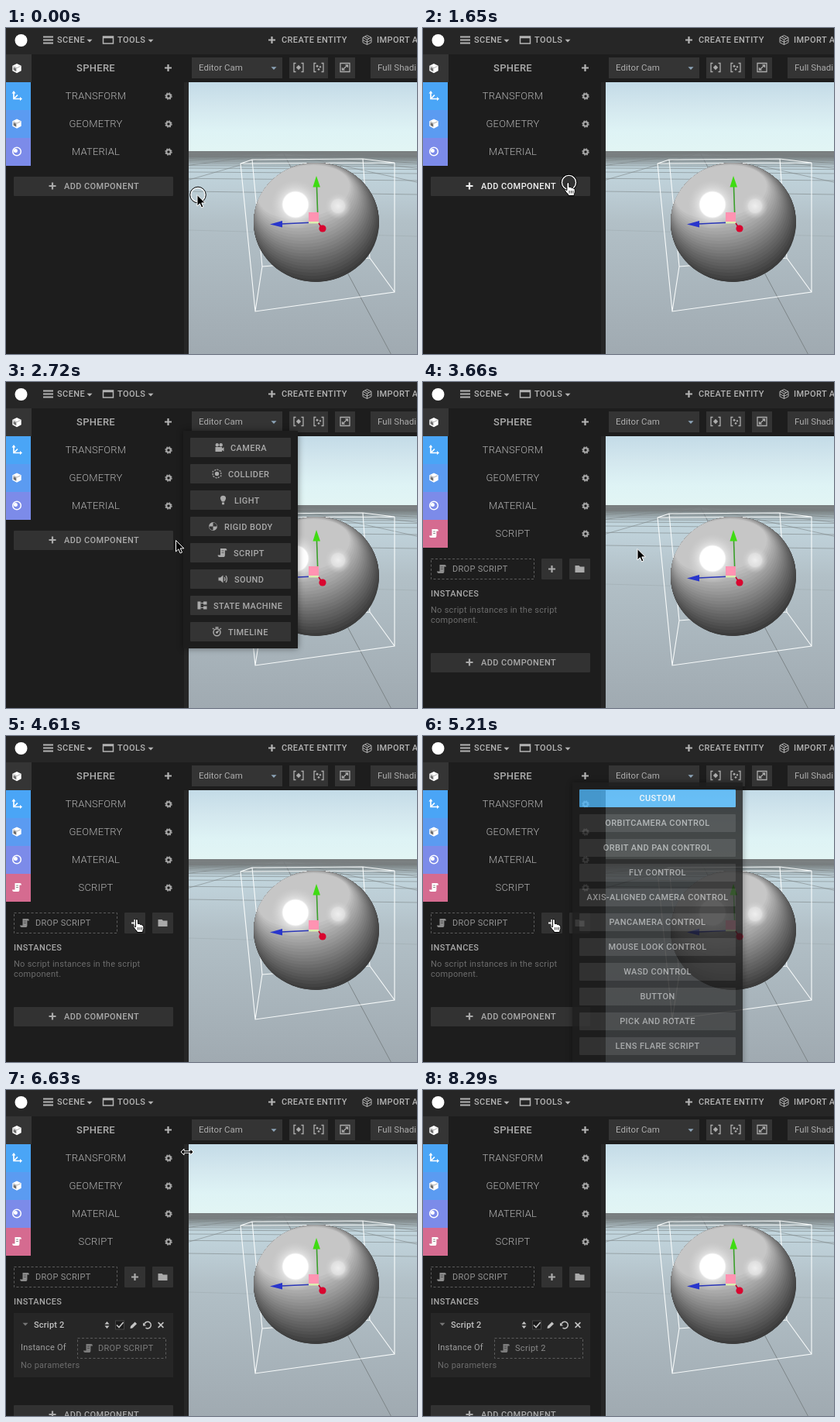
These frames come from a looping animation (531 by 421 pixels, 8.65 s). An HTML page:

```html
<!DOCTYPE html>
<html lang="en">
<head>
<meta charset="utf-8">
<title>Scene editor</title>
<style>
html, body { margin: 0; width: 100%; height: 100%; overflow: hidden; background: #1d1d1d; }
svg { display: block; width: 531px; height: 421px; font-family: Roboto, sans-serif; }
.btn { color: #aaa; }
.btn.hot { color: #f2f2f2; }
.btn.main { color: #fff; }
.btn.main.hot rect { fill: #6cc4ff; }
</style>
</head>
<body>
<svg id="stage" viewBox="0 0 531 421" xmlns="http://www.w3.org/2000/svg"></svg>
<script>
const LOOP = 8650, TICK = 118.49;
const stage = document.getElementById('stage');
const hits = [];

// --- drawing helpers -------------------------------------------------
const rect = (x, y, w, h, fill, more = '') =>
  `<rect x="${x}" y="${y}" width="${w}" height="${h}" fill="${fill}" ${more}/>`;
const ellipse = (x, y, rx, ry, fill) =>
  `<ellipse cx="${x}" cy="${y}" rx="${rx}" ry="${ry}" fill="${fill}"/>`;
const line = (x1, y1, x2, y2, more = '') =>
  `<path d="M${x1} ${y1}L${x2} ${y2}" ${more}/>`;
const group = (id, body, more = '') => `<g id="${id}" ${more}>${body}</g>`;

function text(x, y, s, o = {}) {
  const { size = 11, gap = .4, weight = 500, fill = 'currentColor', mid = false } = o;
  return `<text x="${x}" y="${y}" font-size="${size}" letter-spacing="${gap}" font-weight="${weight}"
    fill="${fill}" ${mid ? 'text-anchor="middle"' : ''}>${s}</text>`;
}

const icons = {
  plus: '<path d="M-4.5 0H4.5M0-4.5V4.5" stroke="currentColor" stroke-width="2.2"/>',
  caret: '<path d="M-3.5-1.8H3.5L0 2Z" fill="currentColor"/>',
  bars: '<path d="M-6.5-4H6.5M-6.5 0H6.5M-6.5 4H6.5" stroke="currentColor" stroke-width="1.8"/>',
  pane: '<path d="M-6.5-4.5H6.5V4.5H-6.5ZM-6.5-3H6.5" fill="none" stroke="currentColor" stroke-width="1.5"/>',
  cube: '<path d="M0-6L5.7-3.2V3.2L0 6.2L-5.7 3.2V-3.2Z" fill="currentColor"/><path d="M-4.4-1.6L-.7.2V4.2L-4.4 2.3Z" fill="#333" fill-opacity=".7"/><path d="M-4.6-2.6L0-.4L4.6-2.6" fill="none" stroke="#333" stroke-opacity=".5" stroke-width=".8"/>',
  wire: '<path d="M0-6L5.5-3.2V3.2L0 6L-5.5 3.2V-3.2ZM-5.5-3.2L0-.4L5.5-3.2M0-.4V6M-2.7-4.6L2.7-1.8M-5.5 0L0 2.8L5.5 0" fill="none" stroke="currentColor"/>',
  axis: '<path d="M-4-5V4H5M-4 4L1-1" fill="none" stroke="currentColor" stroke-width="1.7"/><path d="M-6.5-3L-4-6.5L-1.5-3ZM4 1.5L7 4L4 6.5Z" fill="currentColor"/>',
  ball: '<circle r="5.3" fill="none" stroke="currentColor" stroke-width="1.5"/><circle cx="-1.6" cy="-1" r="2.5" fill="currentColor"/>',
  gear: '<circle r="2.7" fill="none" stroke="currentColor" stroke-width="2.1"/><circle r="4.1" fill="none" stroke="currentColor" stroke-width="1.2" stroke-dasharray="1.8 1.42"/>',
  script: '<path d="M-2.5-5.5H4.2Q6-5.5 6-3H3.4V3Q3.4 5.6 1 5.6H-4Q-6 5.4-6 3H-2.5Z" fill="currentColor"/><path d="M-1-2.5H2M-1 0H2" stroke="#222" stroke-opacity=".5"/>',
  folder: '<path d="M-6-4.5H-1L.5-3H6V4.5H-6Z" fill="currentColor"/>',
  camera: '<circle cx="-2.7" cy="-3.3" r="2.2" fill="currentColor"/><circle cx="2.2" cy="-3.3" r="2.2" fill="currentColor"/><path d="M-5-.5H3.5V1.2L6-.3V5L3.5 3.6V5.5H-5Z" fill="currentColor"/>',
  collider: '<circle r="2.7" fill="currentColor"/><path d="M0-5.8L5.3-3V3L0 5.8L-5.3 3V-3Z" fill="none" stroke="currentColor" stroke-width="1.2" stroke-dasharray="2.2 1.4"/>',
  light: '<path d="M-1.6 2Q-3.6-.6-3.6-2.2A3.6 3.6 0 0 1 3.6-2.2Q3.6-.6 1.6 2ZM-1.5 3H1.5V5.8H-1.5Z" fill="currentColor"/>',
  rigid: '<circle r="5.4" fill="currentColor"/><path d="M0 0V-5A5 5 0 0 1 5 0ZM0 0V5A5 5 0 0 1-5 0Z" fill="#333"/>',
  sound: '<path d="M-6-2H-3.5L0-5V5L-3.5 2H-6Z" fill="currentColor"/><path d="M1.7-2.5Q3.3 0 1.7 2.5M3.5-4.3Q6.5 0 3.5 4.3" fill="none" stroke="currentColor" stroke-width="1.3"/>',
  state: '<path d="M-6-5H-2V5H-6ZM1.5-5H6V-1H1.5ZM1.5 1H6V5H1.5Z" fill="currentColor"/><path d="M-2-3H2M-2 3H2" stroke="currentColor"/>',
  timeline: '<circle cy=".8" r="4.5" fill="none" stroke="currentColor" stroke-width="1.5"/><path d="M-2-5.5H2M0 .8L2.4-1.4M-5.5-4.5L-4-3.2M5.5-4.5L4-3.2" stroke="currentColor" stroke-width="1.5"/><circle cy=".8" r="1.5" fill="currentColor"/>',
  frame: '<path d="M-3.5-5.5H-6V5.5H-3.5M3.5-5.5H6V5.5H3.5" fill="none" stroke="currentColor" stroke-width="1.3"/><path d="M0-3.2L3.2 0L0 3.2L-3.2 0Z" fill="currentColor"/>',
  frames: '<path d="M-3.5-5.5H-6V5.5H-3.5M3.5-5.5H6V5.5H3.5" fill="none" stroke="currentColor" stroke-width="1.3"/><path d="M-2-3.5L0-1.7L-2 .1L-3.8-1.7ZM2-2.2L3.5-.7L2 .8L.5-.7ZM0 .7L1.7 2.4L0 4.1L-1.7 2.4Z" fill="currentColor"/>',
  expand: '<path d="M-6-5.5H6V5.5H-6ZM-3.5 3.2L3.5-3.2M.4-3.2H3.5V-.1M-3.5.2V3.2H-.4" fill="none" stroke="currentColor" stroke-width="1.3"/>',
  sort: '<path d="M-3-1L0-4.5L3-1ZM-3 1L0 4.5L3 1Z" fill="currentColor"/>',
  check: '<rect x="-5.5" y="-5.5" width="11" height="11" fill="#1a1a1a" stroke="#444"/><path d="M-4 0L-1 3L4.6-3.6" fill="none" stroke="currentColor" stroke-width="1.6"/>',
  pencil: '<path d="M-4.5 4.5L-4 1.6L1.6-4L4-1.6L-1.6 4Z" fill="currentColor"/>',
  undo: '<path d="M-4.2-1A4.3 4.3 0 1 1-2.5 3.6" fill="none" stroke="currentColor" stroke-width="1.5"/><path d="M-6-3V1H-2Z" fill="currentColor"/>',
  cross: '<path d="M-3.4-3.4L3.4 3.4M3.4-3.4L-3.4 3.4" stroke="currentColor" stroke-width="1.6"/>'
};
const icon = (name, x, y, color = '') =>
  `<g transform="translate(${x} ${y})" ${color && `color="${color}"`}>${icons[name]}</g>`;

// A button that lights up while the pointer is over it and its layer shows.
function button(layer, x, y, w, h, body, o = {}) {
  hits.push({ layer, x, y, w, h });
  return `<g class="btn ${o.main ? 'main' : ''}" id="b${hits.length - 1}">` +
    rect(x, y, w, h, o.fill || '#323232', 'rx="1"') + body + '</g>';
}
const addButton = (layer, y) => button(layer, 10, y, 206, 25,
  icon('plus', 60, y + 12) + text(75, y + 16, 'ADD COMPONENT'));
const dashed = (x, y, w) =>
  rect(x + .5, y + .5, w - 1, 26, 'none', 'stroke="#5c5c5c" stroke-dasharray="3 2.5"');

// --- 3D view ---------------------------------------------------------
const stops = list => list.map(([o, c, a = 1]) =>
  `<stop offset="${o}" stop-color="${c}" stop-opacity="${a}"/>`).join('');
const linear = (id, list) => `<linearGradient id="${id}" x1="0" y1="0" x2="0" y2="1">${stops(list)}</linearGradient>`;
const radial = (id, list) => `<radialGradient id="${id}">${stops(list)}</radialGradient>`;

const defs = `<defs>
  <clipPath id="view">${rect(236, 70, 295, 351, '#fff')}</clipPath>
  <clipPath id="ball">${ellipse(401, 251, 81, 77, '#fff')}</clipPath>
  ${linear('sky', [[0, '#c3dbe7'], [.35, '#d3e7ee'], [.7, '#def3f5'], [1, '#e2f5f4']])}
  ${linear('ground', [[0, '#7b7f80'], [.035, '#a3b1b6'], [.09, '#c1d5dd'], [.2, '#bccdd5'], [.35, '#b2c0c7'], [1, '#a0aab1']])}
  ${radial('shine', [[0, '#fff'], [.5, '#fff'], [.56, '#e6e6e6', .8], [1, '#d0d0d0', 0]])}
  ${radial('glint', [[0, '#eee'], [.5, '#e2e2e2', .9], [.6, '#d8d8d8', .7], [1, '#ccc', 0]])}
</defs>`;

function grid() {
  let out = '';
  for (let i = 1; i < 22; i++) {
    out += line(236, 161 + 100 / i, 531, 161 + 108 / i, `opacity="${i < 2 ? .2 : .6}"`);
  }
  for (let k = -14; k <= 14; k++) {
    out += line(358, 161, 358 + (.536 + 4 * k) * 262, 423, `opacity="${k ? .6 : 1}"`);
  }
  return `<g stroke="#7d8588" fill="none">${out}</g>`;
}

// Nested ovals, dark at the lower right and light at the upper left.
function sphere(bands = 20) {
  let out = ellipse(401, 251, 81, 77, '#3e3e3e');
  for (let i = 0; i <= bands; i++) {
    const u = i / bands, c = Math.round(60 + 138 * u);
    out += ellipse(400 - 8 * u, 247 - 37.5 * u, 86 - 26 * u, 81 - 47.5 * u, `rgb(${c},${c},${c})`);
  }
  return `<g clip-path="url(#ball)"><g transform="rotate(-10 401 251)">${out}</g></g>`;
}

const scene = `<g clip-path="url(#view)">
  ${rect(236, 70, 295, 90, 'url(#sky)')}
  ${rect(236, 159, 295, 262, 'url(#ground)')}
  ${grid()}
  ${rect(236, 159, 295, 8, '#777b7c', 'opacity=".7"')}
  <path d="M303 175L318 170L461 169L502 174ZM303 175L322 366L502 341V174M318 170L331 308L322 366M331 308L470 297L502 341M461 169L470 297"
    fill="none" stroke="#f8fbfb" stroke-width="1.1"/>
  ${sphere()}
  <circle cx="374" cy="228" r="32" fill="url(#shine)"/>
  <circle cx="429" cy="230" r="17" fill="url(#glint)"/>
  ${line(403, 250, 401.5, 205, 'stroke="#3a9f2a" stroke-width="1.6"')}
  <path d="M401 191L406 205.5H396.5Z" fill="#3fdc12"/>
  ${line(399, 251, 356, 253, 'stroke="#2a36b8" stroke-width="1.6"')}
  <path d="M341 253.5L357 249V257.5Z" fill="#2936cc"/>
  ${rect(391, 238, 13, 12, '#ff93b2')}
  ${rect(391, 250, 13, 2.5, '#dcf0b0')}
  ${line(404, 252, 408, 258, 'stroke="#c0002c" stroke-width="1.6"')}
  <circle cx="409" cy="259" r="4.6" fill="#d9052f"/>
</g>`;

// --- panels ----------------------------------------------------------
const bar = rect(0, 0, 531, 34, '#262626') + '<circle cx="19.5" cy="16" r="8" fill="#fff"/>' +
  `<g color="#b4b4b4">${icon('bars', 54.5, 15.5)}${text(66, 19, 'SCENE')}${icon('caret', 108, 16.5)}
  ${icon('pane', 132, 15.5)}${text(144, 19, 'TOOLS')}${icon('caret', 187, 16.5)}
  ${icon('plus', 343.5, 15.5)}${text(356, 19, 'CREATE ENTITY')}
  ${icon('wire', 466.5, 15.5)}${text(479, 19, 'IMPORT ASSETS')}</g>`;

const label = { size: 11.5, gap: .05, weight: 400 };
const tools = rect(232, 34, 299, 36, '#1d1d1d') + rect(240, 38, 117, 27, '#343434') +
  rect(366, 38, 50, 27, '#343434') + rect(425, 38, 26, 27, '#343434') + rect(471, 38, 70, 27, '#343434') +
  `<g color="#acacac">${text(249, 55, 'Editor Cam', label)}
  ${icon('caret', 346, 52, '#8da4b8')}${icon('frame', 378, 51)}${icon('frames', 404, 51)}${icon('expand', 438, 51)}
  ${text(480, 55, 'Full Shading', label)}</g>`;

function row(i, name, color, pic) {
  const y = 70 + 36 * i;
  return rect(0, y, 32, 36, color) + icon(pic, 14, y + 17.5, '#fff') +
    text(116, y + 22, name, { size: 13, gap: .2, weight: 300, fill: '#b4b4b4', mid: true }) +
    icon('gear', 210, y + 18, '#a8a8a8');
}

const panel = rect(0, 34, 232, 387, '#1d1d1d') + rect(230, 70, 6, 351, '#262626') +
  rect(0, 34, 33, 36, '#353535') + icon('cube', 14, 52, '#fff') +
  text(116, 56, 'SPHERE', { size: 13, gap: .3, fill: '#acacac', mid: true }) + icon('plus', 209.5, 51.5, '#b4b4b4') +
  row(0, 'TRANSFORM', '#4aa5f6', 'axis') + row(1, 'GEOMETRY', '#5b9bf1', 'cube') + row(2, 'MATERIAL', '#7c8be9', 'ball');

const soft = { gap: .27, weight: 400, fill: '#6c6c6c' };
const dropText = (x, y, fill, s = 'DROP SCRIPT') => text(x, y, s, { gap: .3, weight: 400, fill });

const component = row(3, 'SCRIPT', '#d56b90', 'script') + dashed(10, 228, 134) +
  icon('script', 24, 241.5, '#8c8c8c') + dropText(38, 245, '#949494') +
  button('component', 153, 228, 27, 27, icon('plus', 166.5, 241.5)) +
  button('component', 189, 228, 27, 27, icon('folder', 202.5, 241.5)) +
  text(10, 277, 'INSTANCES', { fill: '#a8a8a8' });

const none = text(10, 298, 'No script instances in the script', soft) +
  text(10, 311, 'component.', soft) + addButton('none', 350);

const instance = rect(10, 288, 206, 83, '#262626') + icon('caret', 25, 302.5, '#777') +
  text(36, 307, 'Script 2', { gap: .2, fill: '#c4c4c4' }) +
  ['sort', 'check', 'pencil', 'undo', 'cross'].map((s, i) =>
    icon(s, [130.5, 147, 165, 183, 200][i], 303.5, '#c4c4c4')).join('') +
  text(19, 336, 'Instance Of', { gap: .25, weight: 400, fill: '#a0a0a0' }) + dashed(92, 320, 115) +
  icon('script', 106, 333.5, '#7c7c7c') +
  group('unset', dropText(119, 337, '#7c7c7c')) + group('set', dropText(119, 337, '#8a8a8a', 'Script 2')) +
  text(19, 359, 'No parameters', soft) + addButton('instance', 407);

const kinds = [['CAMERA', 'camera', 290], ['COLLIDER', 'collider', 287], ['LIGHT', 'light', 295],
  ['RIGID BODY', 'rigid', 282], ['SCRIPT', 'script', 294], ['SOUND', 'sound', 295],
  ['STATE MACHINE', 'state', 268], ['TIMELINE', 'timeline', 287]];
const kindMenu = rect(229, 63, 148, 281, '#1d1d1d') + kinds.map(([s, pic, x], i) => {
  const y = 72 + 34 * i;
  return button('kindMenu', 238, y, 130, 25, icon(pic, x - 14.5, y + 12.5) + text(x, y + 17, s), { fill: '#343434' });
}).join('');

const presets = ['CUSTOM', 'ORBITCAMERA CONTROL', 'ORBIT AND PAN CONTROL', 'FLY CONTROL',
  'AXIS-ALIGNED CAMERA CONTROL', 'PANCAMERA CONTROL', 'MOUSE LOOK CONTROL', 'WASD CONTROL',
  'BUTTON', 'PICK AND ROTATE', 'LENS FLARE SCRIPT'];
const presetMenu = rect(193, 60, 220, 370, '#1d1d1d') + presets.map((s, i) =>
  button('presetMenu', 202, 69 + 32 * i, 202, 23, text(303, 84 + 32 * i, s, { mid: true }),
    i ? { fill: '#363636' } : { fill: '#50b6f8', main: true })).join('');

const shadow = 'style="filter:drop-shadow(0 0 4px rgba(0,0,0,.45))"';
const pointer = group('ring', '<circle cx="1" r="9.2" fill="none" stroke="#fff" stroke-width="1.6"/><circle cx="1" r="10.3" fill="none" stroke="#000"/>') +
  group('arrow', '<path d="M0 0V14.5L3.4 11.3L5.6 16.5L8 15.5L5.8 10.4H10.4Z" fill="#000" stroke="#fff"/>') +
  group('hand', '<path d="M-1.6 1.5a1.5 1.5 0 0 1 3 0V6q2.6-.6 2.8.8q2.2-.4 2.6 1q2-.2 2 1.6v2.6q0 1.6-1 3V17H.2v-1.4q-3-2.8-4.6-5.6q.4-2 2.8.2z" fill="#fff" stroke="#000"/><path d="M1.6 10.5V14M4 10.5V14M6.3 10.5V14" stroke="#000" stroke-width=".8"/>') +
  group('resize', '<path d="M-8 0L-4-4V-1.2H4V-4L8 0L4 4V1.2H-4V4Z" fill="#000" stroke="#fff"/>');

stage.innerHTML = defs + scene + panel + tools + bar + group('first', addButton('first', 192)) +
  group('component', component) + group('none', none) + group('instance', instance) +
  group('kindMenu', kindMenu, shadow) + group('presetMenu', presetMenu, shadow) + group('pointer', pointer);

// --- motion ----------------------------------------------------------
// Pointer moves: first tick, number of ticks, x, y at the end.
const moves = [[0, 1, 247, 215.5], [5, 1, 250, 214.5], [7, 5, 187.5, 199.5], [23, 1, 219.5, 204.5],
  [24, 4, 277, 215.5], [34, 6, 169, 236.5], [45, 5, 225, 131], [50, 2, 234, 80], [65, 6, 328, 410]];
const clicks = [[0, 3], [14, 3], [30, 1], [42, 2], [55, 1]];  // tick, ticks until gone

const el = id => document.getElementById(id);
const fade = (n, from, to) => n < from || n >= to ? 0 : Math.min(1, .4 * (n - from + 1));

function place(n) {
  let x = 0, y = 0;
  for (const [at, len, tx, ty] of moves) {
    if (n < at) break;
    const k = Math.min(1, (n - at + 1) / len), e = k * k * (3 - 2 * k);
    x += (tx - x) * e;
    y += (ty - y) * e;
  }
  return [x, y];
}

function draw(t) {
  const n = Math.min(72, Math.floor((t + 20) / TICK));
  const [x, y] = place(n);
  const show = {
    first: n < 31, component: n >= 31, none: n >= 31 && n < 56, instance: n >= 56,
    unset: n < 57, set: n >= 57,
    kindMenu: fade(n, 15, 31), presetMenu: fade(n, 43, 56),
    resize: n >= 56 && n < 65, pointer: n < 70, ring: 0
  };
  for (const [at, len] of clicks) if (n >= at && n < at + len) show.ring = 1 - (n - at) / len;

  let hot = -1;
  hits.forEach((b, i) => {
    if (show[b.layer] && x >= b.x && x < b.x + b.w && y >= b.y && y < b.y + b.h) hot = i;
  });
  if (n >= 56) hot = -1;
  hits.forEach((b, i) => el('b' + i).classList.toggle('hot', i === hot));
  show.hand = hot >= 0;
  show.arrow = !show.hand && !show.resize;

  for (const id in show) {
    el(id).setAttribute('opacity', +show[id]);
    el(id).setAttribute('display', show[id] ? 'inline' : 'none');
  }
  el('pointer').setAttribute('transform', `translate(${x} ${y})`);
}

const start = performance.now();
function run() {
  draw((performance.now() - start) % LOOP);
  requestAnimationFrame(run);
}
run();
</script>
</body>
</html>
```
